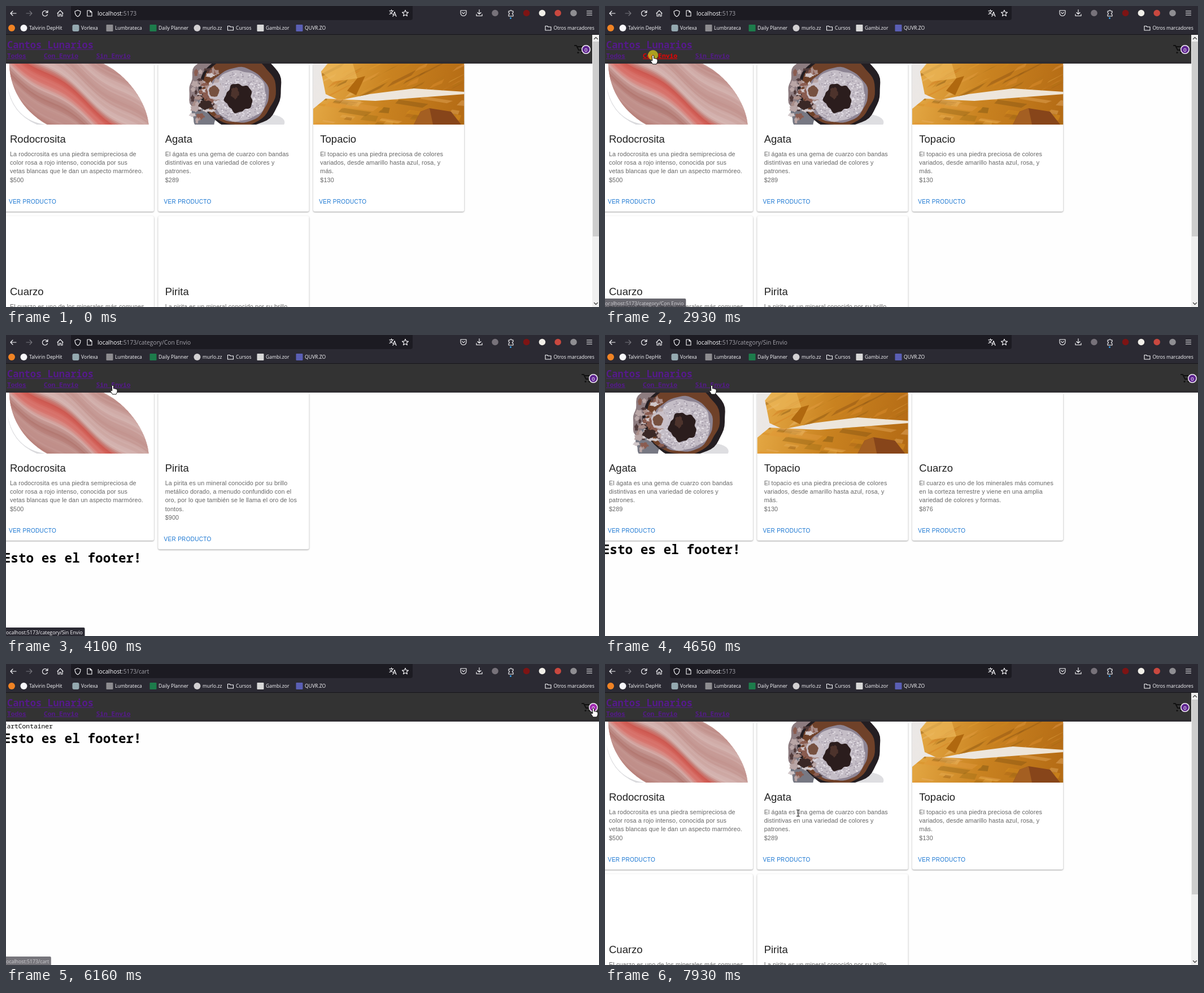
Animation, 1050 px wide and 533 px high, one loop 8000 ms. Source, as an HTML page with a canvas:

```html
<!DOCTYPE html>
<html lang="es">
<head>
<meta charset="utf-8">
<title>Tienda de piedras</title>
<style>
html, body { margin: 0; width: 100%; height: 100%; overflow: hidden; background: #fff; }
canvas { display: block; }
</style>
</head>
<body>
<canvas id="stage" width="1050" height="533"></canvas>
<script>
const ctx = document.getElementById('stage').getContext('2d');
const LOOP = 8000, TAU = Math.PI * 2;
const UI = '"Open Sans", "Noto Sans", sans-serif';
const SANS = '"Liberation Sans", Arial, sans-serif';
const MONO = '"Noto Sans Mono", "DejaVu Sans Mono", monospace';
const CARD_W = 267.2, PITCH = 274.65, LEFT = -5.3, TOP = 102, PHOTO_H = 108;
const WHITE = '#fbfbfe', PURPLE = '#551a8b';

function text(s, x, y, font, color, spacing = 0) {
  ctx.font = font;
  ctx.fillStyle = color;
  ctx.letterSpacing = spacing + 'px';
  ctx.fillText(s, x, y);
  ctx.letterSpacing = '0px';
}
function rect(x, y, w, h, color, r = 0) {
  ctx.fillStyle = color;
  ctx.beginPath();
  ctx.roundRect(x, y, w, h, r);
  ctx.fill();
}
function disc(x, y, r, color) {
  ctx.fillStyle = color;
  ctx.beginPath();
  ctx.arc(x, y, r, 0, TAU);
  ctx.fill();
}
function icon(d, x, y, color = WHITE, w = 1.1, fill) {
  const path = new Path2D(d);
  ctx.save();
  ctx.translate(x, y);
  ctx.lineJoin = ctx.lineCap = 'round';
  if (fill) { ctx.fillStyle = fill; ctx.fill(path); }
  ctx.strokeStyle = color;
  ctx.lineWidth = w;
  ctx.stroke(path);
  ctx.restore();
}
function shape(d, color) {
  ctx.fillStyle = color;
  ctx.fill(new Path2D(d));
}
function slope(x, y, ...colors) {
  const g = ctx.createLinearGradient(0, 0, x, y);
  colors.forEach((c, i) => g.addColorStop(i / (colors.length - 1), c));
  return g;
}
function random(seed) {
  return () => (seed = (seed * 16807) % 2147483647) / 2147483647;
}
// Rough-edged ellipse
function rock(x, y, rx, ry, color, rough = 0.05) {
  ctx.fillStyle = color;
  ctx.beginPath();
  for (let a = 0; a < TAU; a += 0.1) {
    const k = 1 + rough * (Math.sin(a * 5 + rx) + Math.sin(a * 11 + ry) * 0.5);
    ctx.lineTo(x + Math.cos(a) * rx * k, y + Math.sin(a) * ry * k);
  }
  ctx.fill();
}

// ---- stones, drawn in a box of 267 by 108 ----
function rhodochrosite() {
  shape('M8 40Q20 100 75 108H60Q14 88 8 40z', '#dadadd');
  ctx.clip(new Path2D('M11 0C12 40 32 82 78 108H258C254 68 222 22 178 0z'));
  const rnd = random(9);
  for (let off = -190; off < 130; off += 3) {
    const red = Math.exp(-((off / 17) ** 4)), pale = Math.exp(-(((Math.abs(off) - 24) / 7) ** 2));
    const light = 67 + 4 * Math.sin(off / 7) + rnd() * 5 - (off > 20 ? 7 : 0) + pale * 6 - red * 9;
    ctx.strokeStyle = `hsl(${6 - red * 2} ${30 + red * 28}% ${light}%)`;
    ctx.lineWidth = 4;
    ctx.beginPath();
    for (let x = -5; x < 275; x += 6) ctx.lineTo(x, off - 26 + x * 0.72 + 7 * Math.sin(x / 24 - off / 90));
    ctx.stroke();
  }
}
function agate() {
  rock(196, 104, 28, 14, '#dedee1', 0);
  rock(93, 45, 38, 54, '#8d7c80', 0.06);
  rock(82, 88, 22, 30, '#777883');
  rock(146, 46, 73, 68, '#241e22', 0.02);
  rock(143, 48, 65, 62, '#6f4129', 0.02);
  rock(143, 56, 53, 49, '#8d8493', 0.02);
  rock(143, 57, 49, 45, '#c4bdc6', 0.03);
  const rnd = random(41);
  for (let i = 0; i < 260; i++) {
    const a = rnd() * TAU, r = 26 + rnd() * 22;
    rock(143 + Math.cos(a) * r, 58 + Math.sin(a) * r * 0.9, 1.5, 1, i % 2 ? '#e6e1e8' : '#a79eac');
  }
  // Crumbled left side
  for (let i = 0; i < 60; i++) {
    const tone = ['#b9a6a6', '#8a5c50', '#d0c6c8', '#513b3b', '#a98d88'][i % 5];
    rock(60 + rnd() * 48, 8 + rnd() * 98, 2 + rnd() * 6, 2 + rnd() * 5, tone, 0.15);
  }
  rock(102, 49, 15, 15, '#c9c0c8');
  rock(99, 49, 9, 10, '#76503f');
  rock(84, 73, 12, 8, '#3a2826', 0.1);
  rock(143, 61, 24, 25, '#2b1d1d', 0.08);
  rock(136, 52, 7, 10, '#4d332c', 0.1);
}
function topaz() {
  rect(0, 0, 268, PHOTO_H, slope(260, 108, '#ebe8e7', '#efe4d3'));
  const upper = 'M14 14L26 0H268V50L178 44L100 54L46 65L22 54z';
  const lower = 'M0 80L22 62L110 66L268 54V108H0z';
  [[upper, 3, -0.5], [lower, 8, 0.15]].forEach(([outline, seed, tilt]) => {
    const rnd = random(seed * 7919);
    ctx.save();
    ctx.clip(new Path2D(outline));
    rect(0, 0, 268, PHOTO_H, slope(268, 60, '#e7ac48', '#c98220', '#b56c15'));
    ctx.globalAlpha = 0.4;
    for (let i = 0; i < 70; i++) {
      const x = rnd() * 268, y = rnd() * PHOTO_H, w = 10 + rnd() * 45, h = 2 + rnd() * 9;
      ctx.fillStyle = `hsl(${30 + rnd() * 9} 75% ${25 + rnd() * 45}%)`;
      ctx.beginPath();
      ctx.moveTo(x, y);
      ctx.lineTo(x + w, y + w * tilt);
      ctx.lineTo(x + w * 0.8, y + w * tilt + h);
      ctx.lineTo(x - h, y + h);
      ctx.fill();
    }
    ctx.restore();
  });
  shape('M25 0H70L78 26L34 32L14 14z', '#edb95baa');
  shape('M78 26L92 22L76 56L60 48z', '#b0680f');
  shape('M178 108L190 85L206 79L244 85L262 108z', '#87451a');
  shape('M190 85L206 79L212 108H178z', '#a45f22');
}

const STONES = {
  rodo: { name: 'Rodocrosita', price: '$500', draw: rhodochrosite, lines: [
    'La rodocrosita es una piedra semipreciosa de', 'color rosa a rojo intenso, conocida por sus',
    'vetas blancas que le dan un aspecto marmóreo.'] },
  agata: { name: 'Agata', price: '$289', draw: agate, lines: [
    'El ágata es una gema de cuarzo con bandas', 'distintivas en una variedad de colores y', 'patrones.'] },
  topacio: { name: 'Topacio', price: '$130', draw: topaz, lines: [
    'El topacio es una piedra preciosa de colores', 'variados, desde amarillo hasta azul, rosa, y',
    'más.'] },
  cuarzo: { name: 'Cuarzo', price: '$876', lines: [
    'El cuarzo es uno de los minerales más comunes', 'en la corteza terrestre y viene en una amplia',
    'variedad de colores y formas.'] },
  pirita: { name: 'Pirita', price: '$900', lines: [
    'La pirita es un mineral conocido por su brillo', 'metálico dorado, a menudo confundido con el',
    'oro, por lo que también se le llama el oro de los', 'tontos.'] }
};
const PAGES = {
  '/': { cards: Object.keys(STONES), scroll: true },
  '/category/Con Envio': { cards: ['rodo', 'pirita'], footer: 403 },
  '/category/Sin Envio': { cards: ['agata', 'topacio', 'cuarzo'], footer: 387.5 },
  '/cart': { cards: [], footer: 140 }
};
const LINKS = [['Todos', 2], ['Con Envio', 67], ['Sin Envio', 159.5]];
const ENTRY = { x: 986, y: 526 };
// Pointer moves; a link shows its address, `opens` is when its page appears
const MOVES = [
  { from: 70, to: 400, x: 836, y: 384 },
  { from: 930, to: 1070, x: 585, y: 412 },
  { from: 1340, to: 1620, x: 25, y: 129 },
  { from: 1690, to: 1900, x: 24, y: 89, link: '/' },
  { from: 2170, to: 2860, x: 85, y: 87, link: '/category/Con Envio', opens: 3070 },
  { from: 3550, to: 3970, x: 189, y: 89, link: '/category/Sin Envio', opens: 4370 },
  { from: 4910, to: 5400, x: 1029, y: 104 },
  { from: 5670, to: 5880, x: 1040, y: 78, link: '/cart', opens: 6070 },
  { from: 6160, to: 6440, x: 473, y: 108 },
  { from: 6510, to: 7120, x: 100, y: 74, link: '/', opens: 7650 },
  { from: 7650, to: 7930, x: 342, y: 264 }
];
const clamp = v => Math.max(0, Math.min(1, v));

function card(stone, index) {
  const x = LEFT + (index % 3) * PITCH, y = TOP + (index > 2 ? 270 : 0);
  const extra = (stone.lines.length - 3) * 15.4;
  ctx.save();
  ctx.shadowColor = 'rgba(0,0,0,.38)';
  ctx.shadowBlur = 2.5;
  ctx.shadowOffsetY = 1;
  rect(x, y, CARD_W, 262 + extra, '#fff', 3);
  ctx.restore();
  if (stone.draw) {
    ctx.save();
    ctx.translate(x, y);
    ctx.clip(new Path2D(`M0 0H${CARD_W}V${PHOTO_H}H0z`));
    stone.draw();
    ctx.restore();
  }
  text(stone.name, x + 12.3, y + 140, `18.5px ${SANS}`, '#212121');
  [...stone.lines, stone.price].forEach((line, i) =>
    text(line, x + 12.3, y + 163.6 + i * 15.4, `10.8px ${SANS}`, '#666', 0.12));
  text('VER PRODUCTO', x + 10.2, y + 247.6 + extra, `10.02px ${SANS}`, '#1976d2', 0.3);
}

function link(s, x, y, size, color) {
  text(s, x, y, `bold ${size}px ${MONO}`, color);
  rect(x, y + 1.5, ctx.measureText(s).width, 1, color);
}

function header(page, pressed, hovered) {
  const shift = page.scroll ? 0 : 13;
  rect(0, 51, 1050, 51, '#333');
  rect(0, 98, 1050, 4, '#2f2d31');
  link('Cantos Lunarios', 2, 75, 17, pressed === '/' ? '#e00' : PURPLE);
  LINKS.forEach(([s, x]) => link(s, x, 91.5, 11.3, pressed === '/category/' + s ? '#e00' : PURPLE));
  icon('M0 1h3l4 8h7l3-6H4', 1007 + shift, 69, '#111', 2);
  disc(1013 + shift, 82.5, 1.6, '#111');
  disc(1020 + shift, 82.5, 1.6, '#111');
  disc(1027 + shift, 77, 8, '#f4eef7');
  disc(1027 + shift, 77, 6.5, hovered === '/cart' ? '#a02bb0' : '#5f2590');
  text('0', 1024.3 + shift, 80.5, `9.5px ${SANS}`, '#fff');
}

function scrollbar() {
  rect(1038, 51, 12, 482, '#f0f0f0');
  rect(1039, 63, 11, 345, '#cdcdcd');
  icon('M-3 1.5L0-1.5L3 1.5', 1044.5, 57, '#505050', 1.5);
  icon('M-3-1.5L0 1.5L3-1.5', 1044.5, 527, '#505050', 1.5);
}

const FOLDER = 'M-5-3.5h3.5l1.5 1.5h5v6h-10z';
const STAR = 'M' + Array.from({ length: 10 }, (_, i) => {
  const r = i % 2 ? 2.6 : 5.8, a = i * TAU / 10;
  return `${Math.sin(a) * r} ${-Math.cos(a) * r}`;
}).join('L') + 'z';
// Label, left edge, colour and corner radius of the mark (folders have none)
const BOOKMARKS = [
  ['', 19.5, '#f08324', 6], ['Talvirin DepHit', 41, '#f7f7fa', 6], ['Vorlexa', 133, '#94a9b0', 3],
  ['Lumbrateca', 193, '#8d8c90', 1], ['Daily Planner', 270, '#1d7c4b', 1], ['murlo.zz', 348, '#d2d0d2', 6],
  ['Cursos', 407], ['Gambi.zor', 460, '#d8d8d8', 1], ['QUVR.ZO', 529, '#5a5fb4', 1],
  ['Otros marcadores', 969.5]
];

function browser(path) {
  rect(0, 0, 1050, 51, '#2b2a33');
  rect(0, 50, 1050, 1, '#16151b');
  rect(115, -5, 605, 30, '#1c1b22', 4);
  icon('M5 0H-5M-1-4L-5 0L-1 4', 13, 13);
  icon('M-5 0H5M1-4L5 0L1 4', 41, 13, '#77767e');
  icon('M4.5-1.5A4.7 4.7 0 1 0 4.5 2M5-5v3.6H1.4', 69, 13);
  icon('M-5 0L0-5L5 0M-4-1v6H-1.3V1.5H1.3V5H4v-6', 96, 13);
  icon('M0-5.5L5-3.6C5 1 3.5 4 0 5.7C-3.5 4-5 1-5-3.6z', 127, 13);
  icon('M-4-5H1L4-2V5H-4zM1-5v3h3', 148, 13);
  text('localhost', 162, 16.8, `10.25px ${UI}`, WHITE);
  text(':5173' + (path === '/' ? '' : path), 162 + ctx.measureText('localhost').width, 16.8,
    `10.25px ${UI}`, '#a3a2aa');
  icon('M-6-4H1M-2.5-6v2M-.5-4Q-2 1-6 2M-5-2Q-3 1 0 2M0 6L3-2L6 6M1.2 3.5H4.8', 685, 12.5);
  icon(STAR, 707, 13);
  icon('M-5-4.5H5V0A5 5 0 0 1-5 0zM-2.5-1.2L0 1.2L2.5-1.2', 810, 12.5);
  icon('M0-6V2M-3-1L0 2L3-1M-5 2V5H5V2', 838, 12.5);
  icon('M-4-3H-1.5A1.5 1.5 0 1 1 1.5-3H4V0A1.5 1.5 0 1 0 4 3V6H-4V3A1.5 1.5 0 1 0-4 0z', 894, 12);
  disc(893.5, 21.5, 1.4, '#35a4f5');
  ['#77727a', '', '#7d1414', '#f1eee8', '#c9483f', '#8f8e92'].forEach((color, i) =>
    color && disc(866 + i * 27.8, 12.5, 5.8, color));
  icon('M-4.5-3.5H4.5M-4.5 0H4.5M-4.5 3.5H4.5', 1033, 12.5);
  BOOKMARKS.forEach(([label, x, color, r]) => {
    if (color) rect(x - 15.5, 33, 12, 12, color, r);
    else icon(FOLDER, x - 9.5, 39);
    text(label, x, 42.2, `8.6px ${UI}`, WHITE);
  });
}

function hint(path, alpha) {
  const label = 'localhost:5173' + path;
  ctx.globalAlpha = alpha;
  ctx.font = `8.8px ${UI}`;
  rect(-4, 518, ctx.measureText(label).width + 5.5, 19, '#2b2a33', 2);
  text(label, -2.3, 529.5, `8.8px ${UI}`, WHITE);
  ctx.globalAlpha = 1;
}

const ARROW = 'M0 0V12L2.8 9.3L4.7 13.7L6.7 12.8L4.8 8.6H8.5z';
const HAND = 'M-1.5 1Q0-1 1.5 1V6Q3 5 4 6.3Q5.5 5.5 6.2 7Q8 6.5 8 8.5V12L6 16H-.5L-4 10.5Q-4.5 8.5-1.5 9.5z';
const BEAM = 'M-2.5-5.5H2.5M0-5.5V5.5M-2.5 5.5H2.5';
function pointer(x, y, page, hovered, pressed) {
  if (pressed) {
    ctx.globalAlpha = 0.7;
    disc(x, y, 9, '#e0cf18');
    ctx.globalAlpha = 1;
  }
  const overText = page.cards.length && x < 812 && y > 226 && y < 316;
  if (hovered) icon(HAND, x, y, '#111', 1, '#fff');
  else if (overText) icon(BEAM, x, y, '#111');
  else icon(ARROW, x, y, '#111', 1, '#fff');
}

function draw(t) {
  const done = MOVES.filter(m => m.from <= t);
  const move = done[done.length - 1];
  const opened = done.filter(m => m.opens <= t).pop();
  const path = opened ? opened.link : '/', page = PAGES[path];
  const hovered = move && t >= move.to - 20 && move.link;
  const pressed = hovered && t >= move.opens - 140 && t < move.opens && hovered;

  rect(0, 0, 1050, 533, '#fefefe');
  page.cards.forEach((key, i) => card(STONES[key], i));
  if (path === '/cart') text('CartContainer', LEFT, 114, `11.3px ${MONO}`, '#000');
  if (page.footer) text('Esto es el footer!', LEFT, page.footer, `bold 22.7px ${MONO}`, '#000');
  header(page, pressed, hovered || (t < 6230 && move && move.from === 6160 && '/cart'));
  if (page.scroll) scrollbar();
  browser(path);

  // The address bubble outlives its link for a moment
  MOVES.forEach((m, i) => {
    if (!m.link) return;
    const end = m.opens ? m.opens + 155 : MOVES[i + 1].from + 65;
    const alpha = clamp(Math.min(t - m.to, end - t) / 100);
    if (alpha) hint(m.link, alpha);
  });

  if (!move) return;
  const prev = MOVES[done.length - 2] || ENTRY;
  const k = clamp((t - move.from) / (move.to - move.from));
  const ease = k * k * (3 - 2 * k);
  pointer(prev.x + (move.x - prev.x) * ease, prev.y + (move.y - prev.y) * ease,
    page, hovered || (k < 0.1 && prev.link), pressed);
}

const start = performance.now();
function tick() {
  draw((performance.now() - start) % LOOP);
  requestAnimationFrame(tick);
}
tick();
</script>
</body>
</html>
```
